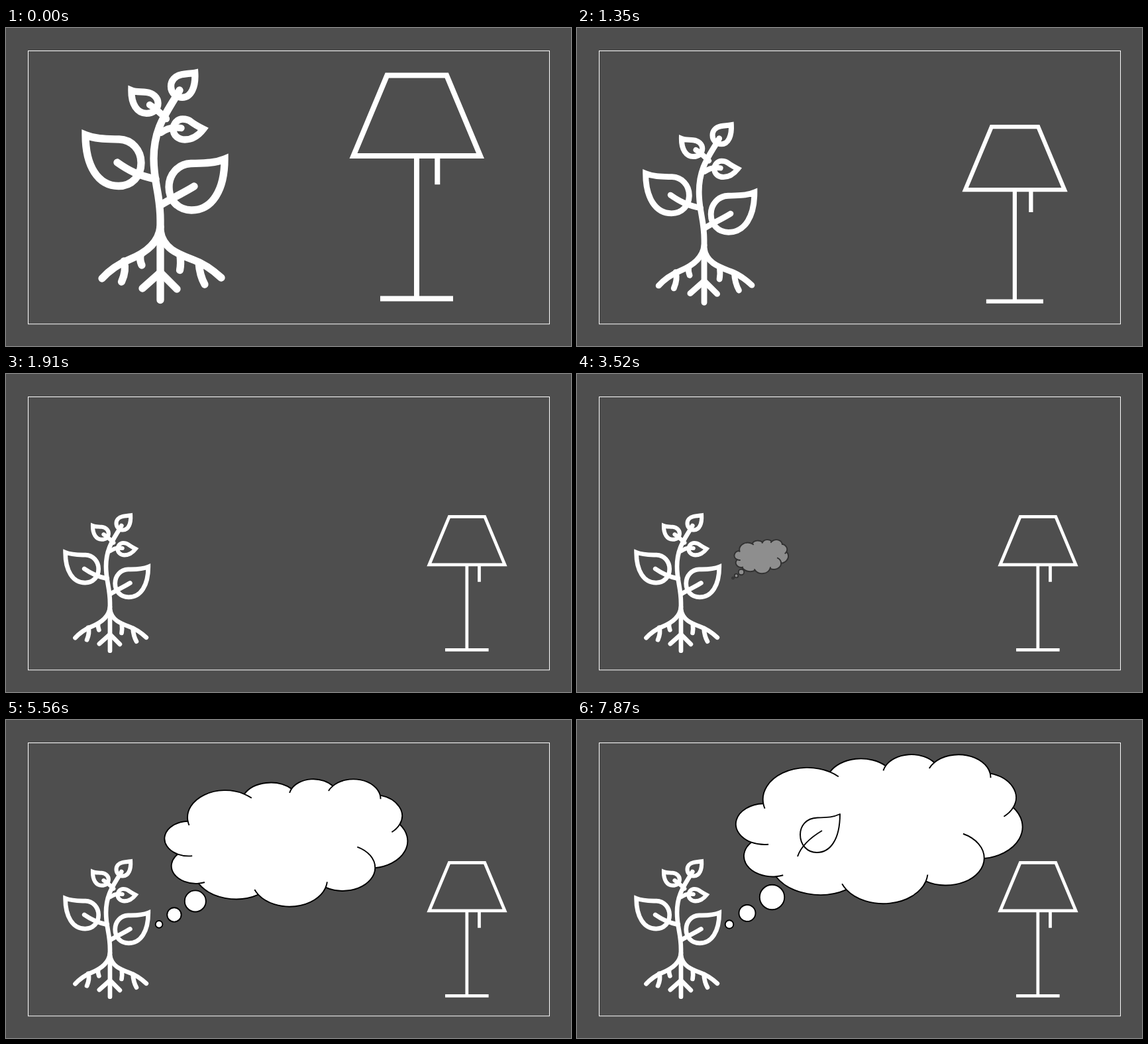
An HTML page that plays this animation: 853 px wide and 480 px high, repeating every 8 s.

```html
<!DOCTYPE html>
<html lang="en">
<head>
<meta charset="utf-8">
<title>Plant and lamp</title>
<style>
  html, body { margin: 0; width: 100%; height: 100%; overflow: hidden; background: #4e4e4e; }
  svg { display: block; width: 853px; height: 480px; }
  .line { fill: none; stroke: #fff; }
  .round { stroke-width: 11.3; stroke-linecap: round; }
  .small { stroke-width: 10.3; }
  .ink { stroke: #000; stroke-width: 1.9; stroke-linejoin: round; vector-effect: non-scaling-stroke; }
</style>
</head>
<body>
<svg viewBox="0 0 853 480">
  <defs>
    <path id="blade" d="M84 0C68 6.5 52 6 33 6.5C14 7 0 23 0 42C0 62 14 77 34 77C65 77 84 47 84 0Z"/>
  </defs>
  <rect class="line" x="33.5" y="34.5" width="787" height="412.3"/>

  <g id="plant" class="line round">
    <!-- stem and roots -->
    <path d="M262 94C245 125 223 148 223 197C223 235 233 250 233 290V410.5"/>
    <path d="M233 300C231 322 215 338 185 350C168 357 155 367 145 378"/>
    <path d="M233 306C237 334 262 342 283 350C300 356 313 366 325 377"/>
    <path d="M178 352C181 362 179 373 174.5 383M203 342C202 350 203 353 205 358"/>
    <path d="M263 344C264 353 264 358 262.5 365.5M291 354C292 368 295 378 300 387"/>
    <path d="M206 393L233 369L258 394"/>
    <!-- large leaves -->
    <use href="#blade" transform="translate(204 161.5) scale(-1 1)"/>
    <use href="#blade" x="246" y="198"/>
    <path d="M168 203C185 215 200 223 226 228M284 239C268 249 250 257 234 267"/>
    <!-- small leaves -->
    <g class="small">
      <path d="M285.2 67.7C278 69 272 69 265 70.3C255 72.3 249 79.5 249 88C249 98 257 104.8 266 104.8C280 104.8 286.5 88 285.2 67.7Z"/>
      <path d="M189.4 94.2C196 97 203 96 212 97C222 98 229.5 105 229.5 113.5C229.5 123 222 128.8 212 128.8C198 128.8 189 115 189.4 94.2Z"/>
      <path d="M298 152.6C290 148.5 284 145 279 141.3C276 138.8 270 137.5 266.5 137.5C259 137.5 252.5 144 252.5 153C252.5 162 260 168.5 270 168.5C283 168.5 291.5 161 298 152.6Z"/>
      <path d="M217 116C225 121 234 129 242 137M264.5 151C252 149 243 151 234 158"/>
    </g>
  </g>

  <g id="lamp" class="line" stroke-width="8">
    <path d="M575.3 71.4H665.2L716 193H524.5Z"/>
    <path d="M620 193V408M651.3 193V236.3M565 408.5H675"/>
  </g>

  <g id="thought" fill="#fff">
    <path id="puff" class="ink"/>
    <path id="curls" class="ink" fill="none"/>
    <circle class="ink"/>
    <circle class="ink"/>
    <circle class="ink"/>
  </g>

  <g id="leaf" class="ink" fill="none">
    <path d="M397 142C385 147.5 377 147 363 147.5C345 148 337 161 337 173C337 189 348 200 362 200C382 200 397 181 397 142Z"/>
    <path d="M370 167Q340 185 333 206"/>
  </g>
</svg>

<script>
const LOOP = 8000, STEP = 70;
const CLOUD_W = 432, CLOUD_H = 317.3;

// Round lobes, clockwise: where each begins, its radius, and how many
// degrees its line runs on inside the cloud before and after.
const LOBES = [
  { x: 39, y: 105.5, r: 67.5, before: 9, after: 14 },
  { x: 140, y: 38, r: 53.3 },
  { x: 224.5, y: 25, r: 43.7, before: 14 },
  { x: 298.3, y: 18, r: 48.6, before: 17, after: 11 },
  { x: 383, y: 41, r: 53.3, after: 26 },
  { x: 418, y: 113.5, r: 67.8 },
  { x: 374, y: 222, r: 57.9, before: 64 },
  { x: 285.5, y: 270.5, r: 67.5, before: 12, after: 12 },
  { x: 165, y: 288.5, r: 77.2 },
  { x: 58, y: 260.5, r: 43.6, before: 15 },
  { x: 21, y: 187.7, r: 43.5, before: 35 }
];

const byId = id => document.getElementById(id);
const mix = (a, b, p) => a + (b - a) * p;

function buildCloud() {
  let puff = `M${LOBES[0].x} ${LOBES[0].y}`, curls = "";
  LOBES.forEach(({ x, y, r, before = 0, after = 0 }, i) => {
    const next = LOBES[(i + 1) % LOBES.length];
    const dx = next.x - x, dy = next.y - y, len = Math.hypot(dx, dy);
    const k = Math.sqrt(Math.max(0, r * r - len * len / 4)) / len;
    const cx = x + dx / 2 - dy * k, cy = y + dy / 2 + dx * k;
    const curl = (px, py, deg) => {
      const a = Math.atan2(py - cy, px - cx), b = a + deg * Math.PI / 180;
      curls += `M${px} ${py}A${r} ${r} 0 0 ${deg > 0 ? 1 : 0} ` +
        `${cx + r * Math.cos(b)} ${cy + r * Math.sin(b)}`;
    };
    puff += `A${r} ${r} 0 0 1 ${next.x} ${next.y}`;
    if (before) curl(x, y, -before);
    if (after) curl(next.x, next.y, after);
  });
  byId("puff").setAttribute("d", puff + "Z");
  byId("curls").setAttribute("d", curls);
}

function shrink(id, dx, dy, p) {
  byId(id).setAttribute("transform",
    `translate(${dx * p} ${dy * p}) scale(${mix(1, .596, p)})`);
}

const dots = document.querySelectorAll("#thought circle");

function drawThought(p) {
  const w = mix(81, 430, p), h = mix(51, 225, p);
  const place = `translate(${mix(238, 242.5, p)} ${mix(250, 51.5, p)}) ` +
    `scale(${w / CLOUD_W} ${h / CLOUD_H})`;
  byId("puff").setAttribute("transform", place);
  byId("curls").setAttribute("transform", place);

  const dot = (i, x, y, r) => {
    dots[i].setAttribute("cx", x);
    dots[i].setAttribute("cy", y);
    dots[i].setAttribute("r", r);
  };
  dot(0, mix(248, 294.5, p), mix(299, 267.5, p), h / 12);
  dot(1, mix(240.5, 257, p), mix(304.5, 291.5, p), h / 18);
  dot(2, mix(235.5, 230, p), mix(308, 308.5, p), h / 36);
}

// Progress from 0 to 1 in whole steps; the first one is taken at the start.
function progress(t, start, steps) {
  const k = Math.floor((t - start) / STEP) + 1;
  return Math.min(Math.max(k / steps, 0), 1);
}

// Soft start, long settling.
const glide = t => 1 - (1 - t) ** 4 * (1 + 4 * t);
const fade = t => t && mix(.2, 1, t);

function draw(t) {
  const p = glide(progress(t, 1140, 12));
  shrink("plant", 18.1, 173, p);
  shrink("lamp", 326.3, 172.8, p);
  drawThought(glide(progress(t, 5210, 12)));
  byId("thought").setAttribute("opacity", fade(progress(t, 3520, 5)));
  byId("leaf").setAttribute("opacity", fade(progress(t, 7590, 5)));
}

const begin = performance.now();
function tick() {
  draw((performance.now() - begin) % LOOP);
  requestAnimationFrame(tick);
}
buildCloud();
draw(0);
requestAnimationFrame(tick);
</script>
</body>
</html>
```
